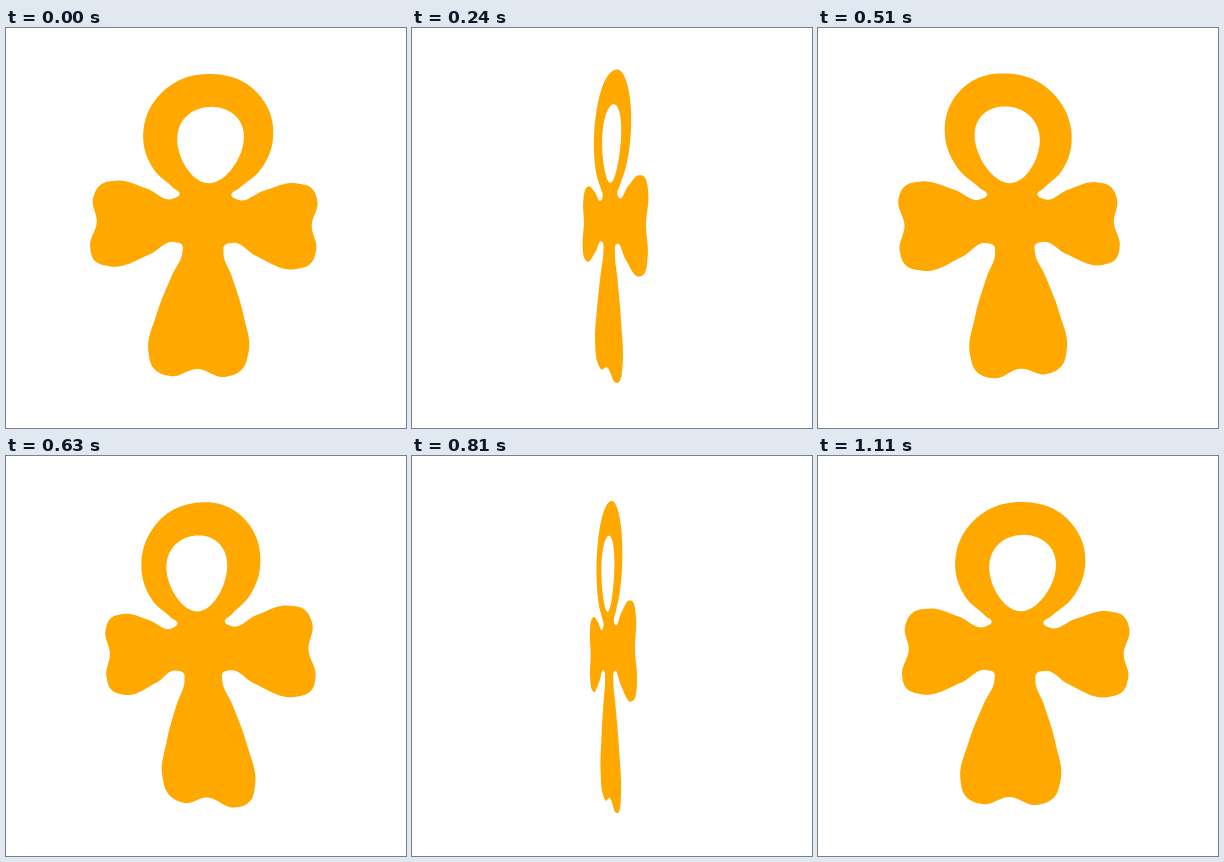
An HTML page with a canvas for the animation above (1.17 s loop, 400x400 px).

```html
<!DOCTYPE html>
<html lang="en">
<head>
<meta charset="utf-8">
<title>Turning ankh</title>
<style>
  html, body { margin: 0; width: 100%; height: 100%; overflow: hidden; background: #fff; }
  canvas { display: block; width: 100vw; height: 100vh; }
</style>
</head>
<body>
<canvas id="stage" width="400" height="400"></canvas>
<script>
const ctx = document.getElementById('stage').getContext('2d');
const STEP = 30, LOOP = 1170, TURN = LOOP / STEP;
const CX = 197, CY = 200, DEPTH = 575;
const LEAN = 0.045, TILT = 0.015;

// Right half of the outline from the top of the ring to the foot.
const half = [
  [0, -154], [46, -137], [65, -95], [53, -58], [33, -40], [26, -33],   // ring
  [32, -29], [59, -38.5], [90, -46], [106, -41], [112, -29],           // arm
  [107.5, -4], [113, 20.5], [108, 34], [94, 39.5], [53, 27], [29, 14.5],
  [21, 17.5], [20.5, 24], [30, 48], [43.5, 87], [50, 124], [44, 141],  // stem
  [27, 148.5], [0, 141]
];

const mirrored = half.slice(1, -1).reverse().map(([x, y]) => [-x, y]);
const body = smooth([...half, ...mirrored]);

const hole = Array.from({ length: 90 }, (_, i) => {
  const t = i / 90 * 2 * Math.PI;
  return [2.5 + 32.7 * Math.sin(t) * (1 + 0.2 * Math.cos(t)), -83 - 38.2 * Math.cos(t)];
});

// The symmetric figure leans slightly and sits just off the axis.
const shapes = [body, hole].map(pts =>
  pts.map(([x, y]) => [x + 1 - y * LEAN, y + x * TILT]));

// Closed curve whose tangent at each point is that of the circle
// through the point and its two neighbours.
function smooth(pts, parts = 12) {
  const n = pts.length;
  const at = i => pts[(i + n) % n];
  const gap = i => Math.hypot(at(i + 1)[0] - at(i)[0], at(i + 1)[1] - at(i)[1]);
  const tangent = i => {
    const a = gap(i - 1) ** 2, b = gap(i) ** 2;
    const [x, y] = [0, 1].map(k =>
      (at(i)[k] - at(i - 1)[k]) / a + (at(i + 1)[k] - at(i)[k]) / b);
    const len = Math.hypot(x, y);
    return [x / len, y / len];
  };
  const out = [];
  for (let i = 0; i < n; i++) {
    const p = at(i), q = at(i + 1), h = 0.36 * gap(i);
    const a = tangent(i), b = tangent(i + 1);
    for (let j = 0; j < parts; j++) {
      const t = j / parts, m = 1 - t;
      out.push([0, 1].map(k =>
        m * m * m * p[k] + 3 * m * m * t * (p[k] + h * a[k]) +
        3 * m * t * t * (q[k] - h * b[k]) + t * t * t * q[k]));
    }
  }
  return out;
}

// Even turn in steps that jumps over each edge-on pose and rests at the end.
function angleAt(ms) {
  const k = Math.floor((ms % LOOP) / STEP);
  const step = k + (k >= 10) + (k >= 28);
  return Math.min(step, TURN) / TURN * 2 * Math.PI;
}

function draw(ms) {
  const a = angleAt(ms), c = Math.cos(a), s = Math.sin(a);
  ctx.fillStyle = '#fff';
  ctx.fillRect(0, 0, 400, 400);
  ctx.beginPath();
  for (const pts of shapes) {
    pts.forEach(([u, v], i) => {
      const p = DEPTH / (DEPTH - u * s);
      const x = CX + u * c * p, y = CY + v * p;
      if (i) ctx.lineTo(x, y);
      else ctx.moveTo(x, y);
    });
    ctx.closePath();
  }
  ctx.fillStyle = '#ffa800';
  ctx.fill('evenodd');
}

function tick(now) {
  draw(now);
  requestAnimationFrame(tick);
}
draw(0);
requestAnimationFrame(tick);
</script>
</body>
</html>
```
